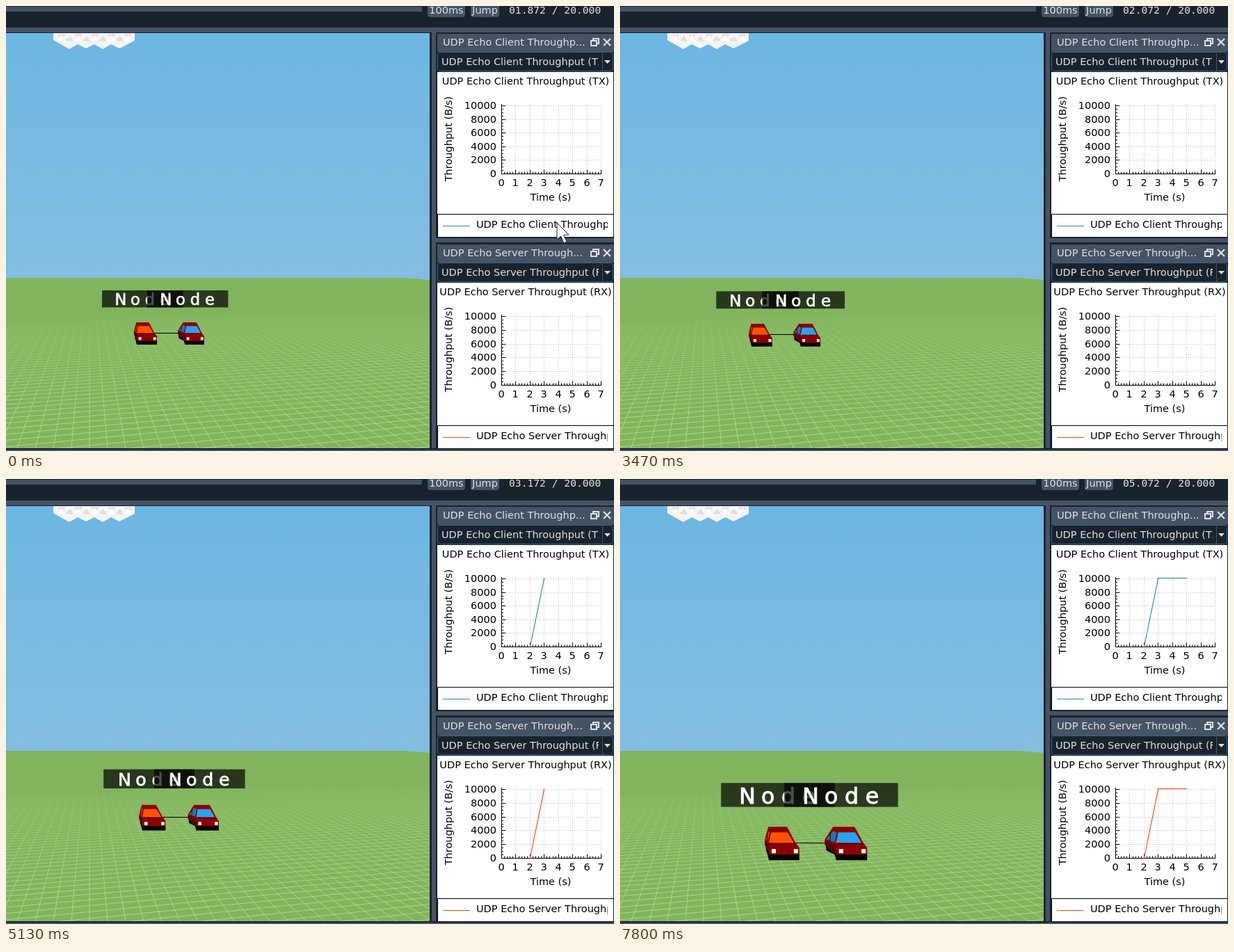
Recreate the animation shown at these times as an HTML page with a canvas. Size 874x640 px, loop 8 s.

```html
<!DOCTYPE html>
<html lang="en">
<head>
<meta charset="utf-8">
<title>Network simulation</title>
<style>
  html, body { margin: 0; width: 100%; height: 100%; overflow: hidden; background: #19232d; }
  canvas { display: block; }
</style>
</head>
<body>
<canvas id="stage" width="874" height="640"></canvas>
<script>
const W = 874, H = 640, LOOP = 8000;
const DARK = '#19232d', PANEL = '#455364', LIGHT = '#dfe1e2';
const SANS = '14.5px "DejaVu Sans", sans-serif';
const MONO = '14.65px "DejaVu Sans Mono", monospace';
const VX = 120, VY = 339;               // vanishing point of the road
const stage = document.getElementById('stage').getContext('2d');
const back = document.createElement('canvas');
back.width = W;
back.height = H;
let g = back.getContext('2d');

function rect(color, x, y, w, h) {
  g.fillStyle = color;
  g.fillRect(x, y, w, h);
}

function poly(color, ...pts) {
  g.fillStyle = color;
  g.beginPath();
  pts.forEach(p => g.lineTo(...p));
  g.closePath();
  g.fill();
}

function line(color, width, ...pts) {
  g.strokeStyle = color;
  g.lineWidth = width;
  g.beginPath();
  pts.forEach(p => g.lineTo(...p));
  g.stroke();
}

function text(str, x, y, color = '#000', align = 'left', font = SANS) {
  g.font = font;
  g.fillStyle = color;
  g.textAlign = align;
  g.fillText(str, x, y);
}

function clipped(x, y, w, h, draw) {
  g.save();
  g.beginPath();
  g.rect(x, y, w, h);
  g.clip();
  draw();
  g.restore();
}

// Piecewise linear interpolation through [time, value] pairs
function track(points, t) {
  if (t <= points[0][0]) return points[0][1];
  for (let i = 1; i < points.length; i++) {
    const [t0, a] = points[i - 1], [t1, b] = points[i];
    if (t <= t1) return a + (b - a) * (t - t0) / (t1 - t0);
  }
  return points[points.length - 1][1];
}

// ---- static parts ----

function drawLand() {
  const sky = g.createLinearGradient(0, 40, 0, 390);
  sky.addColorStop(0, '#6db7e3');
  sky.addColorStop(1, '#83bde0');
  rect(sky, 0, 39, 609, 360);
  poly('#82b45d', [0, 391], [575, 391], [609, 394], [609, 636], [0, 636]);

  const fade = g.createLinearGradient(0, 440, 0, 600);
  fade.addColorStop(0, 'rgba(178,222,142,0)');
  fade.addColorStop(0.35, 'rgba(178,222,142,.38)');
  fade.addColorStop(1, 'rgba(178,222,142,.85)');
  for (let x = VX - 312; x < 1500; x += 26) line(fade, 1, [VX, VY], [x, 636]);
  for (let z = 2; z < 6.8; z += 0.088) {
    const d = 719 / z;
    line(fade, 1, [0, VY + d * 1.109], [609, VY + d * 0.891]);
  }

  // cloud underside
  poly('#f4f4f4', [68, 39], [68, 49], [91, 62], [103, 55], [115, 61], [127, 55],
    [139, 62], [151, 55], [163, 61], [185, 50], [185, 39]);
  for (let i = 0; i < 9; i++) {
    const x = 74 + i * 12;
    poly(i % 2 ? '#fff' : '#e3e3e3', [x, 40], [x + 12, 40], [x + 6, 49]);
    poly(i % 2 ? '#dfdfdf' : '#fff', [x, 50], [x + 6, 42], [x + 11, 51]);
  }
}

function drawFrame() {
  rect(DARK, 0, 0, W, 31);
  rect(PANEL, 0, 1, 598, 7);
  for (const [label, x, w] of [['100ms', 606, 54], ['Jump', 668, 41]]) {
    g.fillStyle = PANEL;
    g.beginPath();
    g.roundRect(x, -8, w, 24, 4);
    g.fill();
    text(label, x + w / 2, 11, LIGHT, 'center');
  }
  rect(PANEL, 0, 31, W, 7);
  rect(DARK, 0, 38, W, 1);
  rect(DARK, 609, 38, 265, 602);
  rect(PANEL, 612, 38, 6, 598);
  rect(DARK, 0, 636, W, 2);
  rect(PANEL, 0, 638, W, 2);
}

const docks = [
  { y: 0, low: 0, name: 'Client', short: 'Client Throughp...', tag: 'TX', color: '#2f86c1' },
  { y: 303, low: 304, name: 'Server', short: 'Server Through...', tag: 'RX', color: '#ff4a12' }
];
const plotX = v => 712.5 + v * 20.43;
const plotY = (d, v) => 241.5 + d.low - v * (98 + d.low - d.y) / 10000;
const snap = v => Math.floor(v) + 0.5;

function drawDock(d) {
  const { y, low, color } = d;
  const title = `UDP Echo ${d.name} Throughput (${d.tag})`;
  rect(PANEL, 620, y + 40, 254, 26);
  text('UDP Echo ' + d.short, 628, y + 57, LIGHT);
  g.strokeStyle = LIGHT;
  g.lineWidth = 2;
  g.strokeRect(844, y + 47, 8, 7);
  g.strokeRect(841, y + 50, 8, 7);
  rect(PANEL, 842, y + 51, 6, 5);
  line(LIGHT, 2.2, [859, y + 47], [869, y + 57]);
  line(LIGHT, 2.2, [869, y + 47], [859, y + 57]);

  rect(DARK, 620, y + 66, 254, 29);
  g.strokeStyle = '#346792';
  g.lineWidth = 1;
  g.beginPath();
  g.roundRect(620.5, y + 66.5, 252, 27, 4);
  g.stroke();
  line(PANEL, 1, [857.5, y + 68], [857.5, y + 93]);
  poly(LIGHT, [860, y + 78], [869, y + 78], [864.5, y + 83]);
  clipped(622, y + 66, 230, 28, () => text(title, 626, y + 85, LIGHT));

  rect('#fff', 620, y + 95, 253, 237 + low - y);
  text(title, 747, y + 113, '#000', 'center');

  const top = y + 141, base = low + 241.5;
  g.setLineDash([1, 2]);
  for (let i = 1; i <= 7; i++) line('#bdbdbd', 1, [snap(plotX(i)), top], [snap(plotX(i)), base]);
  for (let v = 2000; v <= 10000; v += 2000) line('#bdbdbd', 1, [712, snap(plotY(d, v))], [856, snap(plotY(d, v))]);
  g.setLineDash([]);
  line('#000', 1, [712.5, top], [712.5, base]);
  line('#000', 1, [712, base], [856, base]);
  for (let i = 0; i <= 35; i++) {
    const x = snap(plotX(i / 5));
    line('#000', 1, [x, base], [x, base - (i % 5 ? 3 : 6)]);
    if (i % 5 === 0) text(i / 5, x - 0.5, low + 259, '#000', 'center');
  }
  for (let i = 0; i <= 20; i++) {
    const ty = snap(plotY(d, i * 500));
    line('#000', 1, [712, ty], [712 + (i % 4 ? 3 : 6), ty]);
    if (i % 4 === 0) text(i * 500, 705, ty + 4.5, '#000', 'right');
  }
  text('Time (s)', 783, low + 280, '#000', 'center');
  g.save();
  g.translate(641, y + 191);
  g.rotate(-Math.PI / 2);
  text('Throughput (B/s)', 0, 0, '#000', 'center');
  g.restore();

  line('#000', 1, [873, low + 299.5], [620.5, low + 299.5], [620.5, low + 332]);
  line(color, 1, [628, low + 316.5], [667, low + 316.5]);
  clipped(670, low + 300, 195, 30, () => text(title, 676, low + 319));
}

drawLand();
drawFrame();
docks.forEach(drawDock);
rect(DARK, 620, 332, 254, 11);
rect(PANEL, 612, 334, 262, 6);
rect(PANEL, 620, 343, 254, 2);
g = stage;

// ---- moving parts ----

const ticks = [[3130, 0], [4000, 6], [5130, 13], [6200, 21], [6870, 25], [7800, 32], [8000, 33]];
const depths = [[3130, 1], [4000, 0.9526], [5130, 0.8916], [6200, 0.819], [6870, 0.7735], [7800, 0.7126]];

// side: width of the visible flank; grow: how fast the width swells when nearing
function drawCar(k, x, side, base, grow, glass, flank) {
  const s = side, w = s + 42;
  g.save();
  g.translate(VX + x * k, VY + 132 * k);
  g.scale(base * k ** grow, 0.667 * k ** 1.2);
  g.translate(-w / 2, -24);
  poly('#000', [1, 22], [s, 30], [w, 39], [w, 48], [s - 2, 48], [s - 4, 40], [2, 34]);
  poly('#8b0000', [s * 0.65, 0], [s + 24, 0], [s + 27, 5], [s + 36, 22], [w, 30], [w, 40], [s - 1, 40], [0, 26], [0, 18], [s * 0.5, 4]);
  poly('#5a0000', [0, 20], [s - 2, 25], [s - 1, 40], [s * 0.6, 35], [0, 26]);
  poly(flank, [s * 0.65, 6], [s - 1, 8], [s - 4, 22], [s * 0.12, 18]);
  line('#4a0000', 1.2, [s * 0.45, 7], [s * 0.4, 21]);
  poly(glass, [s + 1, 8], [s + 25, 8], [s + 34, 23], [s - 2, 23]);
  line('#4a0000', 1, [s - 2, 24.5], [s + 37, 24.5]);
  rect('#fff', s + 2, 32, 6, 6);
  rect('#fff', s + 34, 32, 6, 6);
  g.restore();
}

function drawLabel(x) {
  rect('rgba(0,0,0,.69)', x, 70, 116.5, 24.5);
  g.strokeStyle = '#fff';
  g.lineWidth = 0.7;
  [...'Node'].forEach((c, i) => {
    const cx = x + 27 + i * 21;
    text(c, cx, 91, '#fff', 'center', '22.5px "DejaVu Sans", sans-serif');
    g.strokeText(c, cx, 91);
  });
}

function drawNodes(t) {
  const k = 1 / track(depths, t);
  const wire = snap(VY + 131.4 * k);
  line('#000', 1.2, [VX + 81 * k, wire], [VX + 146 * k, wire]);
  drawCar(k, 80.5, 8, 0.66, 1.2, '#ff5000', '#c84000');
  drawCar(k, 146, 18, 0.63, 1.4, '#2ba2f0', '#1f74ae');
  g.save();
  g.translate(VX, VY);
  g.scale(k, k);
  drawLabel(18);
  drawLabel(82.8);
  g.restore();
}

function drawCurve(d, last) {
  if (last < 3) return;
  const pts = [[plotX(2), plotY(d, 0)]];
  for (let s = 3; s <= last; s++) pts.push([plotX(s), snap(plotY(d, 10100))]);
  line(d.color, 1.2, ...pts);
}

function drawArrow(x, y) {
  g.save();
  g.translate(x, y);
  g.beginPath();
  [[0, 0], [0, 24], [5.5, 19], [10, 29], [14, 27], [9.5, 17.5], [17, 17]].forEach(p => g.lineTo(...p));
  g.closePath();
  g.fillStyle = '#fff';
  g.fill();
  g.strokeStyle = '#222';
  g.lineWidth = 1;
  g.stroke();
  g.restore();
}

function drawBlockArrow(x, y) {
  for (let i = 0; i < 6; i++) rect('#000', x, y + i * 4, 6 + i * 6, 4);
  for (let i = 0; i < 3; i++) rect('#000', x, y + 24 + i * 4, 16 - i * 5, 4);
  for (let i = 0; i < 5; i++) rect('#000', x + 12 + i * 3, y + 22 + i * 4, 11, 4);
}

function drawCursor(t) {
  if (t < 200) {
    const p = track([[0, 0], [66, 0.3], [133, 1]], t);
    drawArrow(792 - 175 * p, 312 - 259 * p);
  } else if (t >= 3660 && t < 4530) {
    drawBlockArrow(
      track([[3660, 0], [3930, 838], [4190, 838], [4530, 872]], t),
      track([[3660, 60], [3930, 422], [4190, 422], [4530, 640]], t));
  }
}

function draw() {
  const now = performance.now() % LOOP;
  const t = Math.floor(now * 0.015 + 0.05) / 0.015;   // 15 pictures per second
  const sim = 1.872 + Math.floor(track(ticks, t + 4)) / 10;
  g.drawImage(back, 0, 0);
  drawNodes(t);
  text(sim.toFixed(3).padStart(6, '0') + ' / 20.000', 723, 11, LIGHT, 'left', MONO);
  docks.forEach(d => drawCurve(d, Math.floor(sim)));
  drawCursor(t);
  requestAnimationFrame(draw);
}
draw();
</script>
</body>
</html>
```
